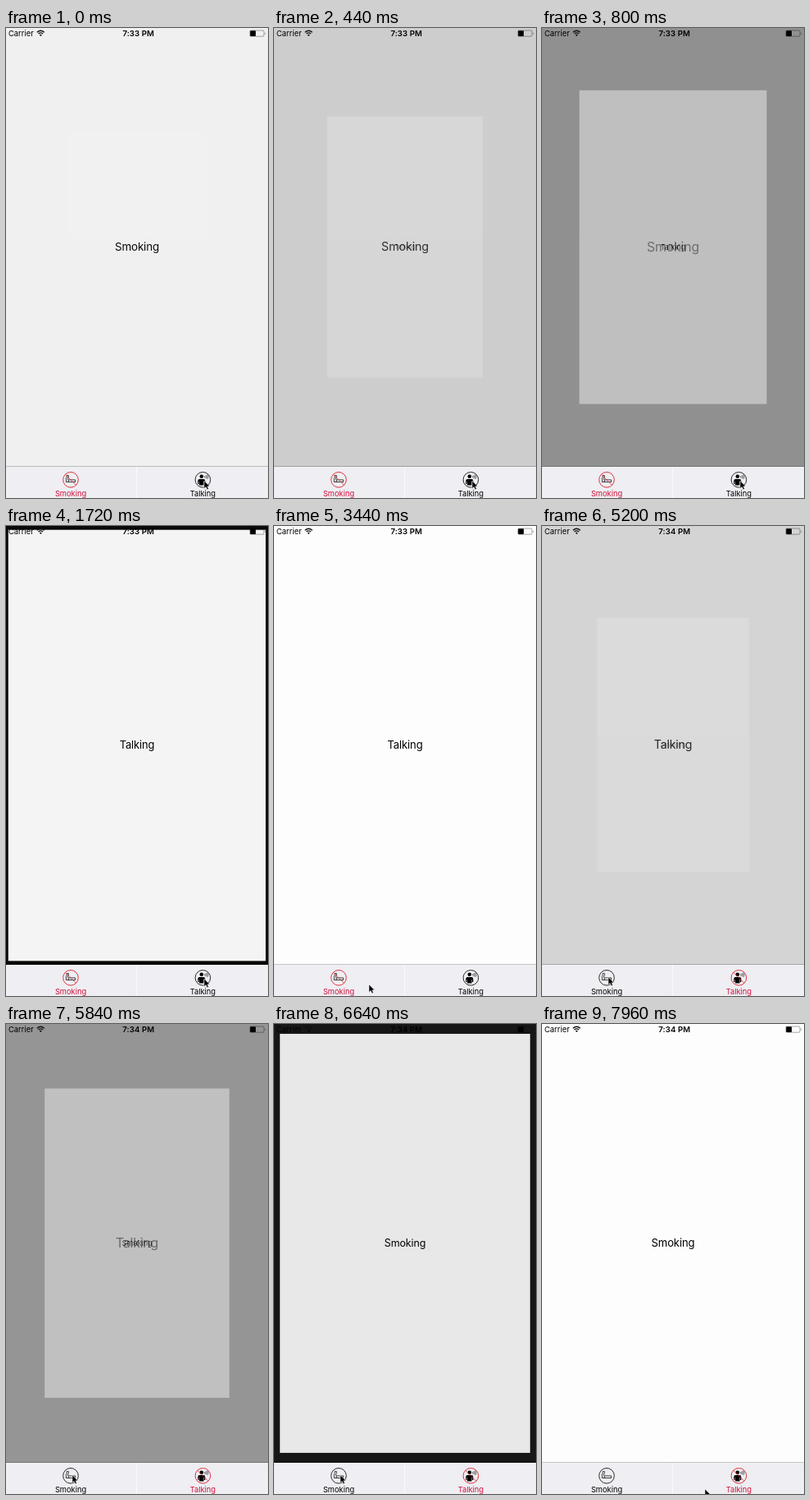
Write an HTML page that moves like this. It is 320 px wide and 572 px high and loops after 8 s.

```html
<!DOCTYPE html>
<html lang="en">
<head>
<meta charset="utf-8">
<title>Tab transition</title>
<style>
html, body { margin: 0; width: 100%; height: 100%; overflow: hidden; background: #000; }
svg { display: block; width: 320px; height: 572px; font-family: Inter, Roboto, sans-serif; }
.title { font-size: 13.1px; letter-spacing: -.15px; text-anchor: middle; }
.label { font-size: 9.3px; text-anchor: middle; fill: currentColor; }
.status { font-size: 9.4px; }
.clock { font-size: 9.6px; font-weight: 600; letter-spacing: .1px; text-anchor: middle; }
.tab { color: #000; }
.tab.on { color: #d0103a; }
.ring, .slash { fill: none; stroke: #222; stroke-width: .95; }
.slash { display: none; stroke-width: .8; }
.on .ring, .on .slash { display: inline; stroke: #dc2c34; }
.line { fill: none; stroke: #111; }
</style>
</head>
<body>
<svg viewBox="0 0 320 572">
  <rect width="320" height="572"/>
  <g id="views">
    <g id="smoking"><rect width="320" height="534" fill="#fdfdfd"/><text class="title" x="160" y="271">Smoking</text></g>
    <g id="talking"><rect width="320" height="534" fill="#fdfdfd"/><text class="title" x="160" y="271">Talking</text></g>
  </g>

  <text class="status" x="3" y="10.2">Carrier</text>
  <g class="line" stroke-width="1.3">
    <path d="M37.8 5.2Q42.3 1.2 46.8 5.2M39.5 7.1Q42.3 4.6 45.1 7.1"/>
    <path d="M42.3 10L40.8 8.3Q42.3 7.1 43.8 8.3Z" fill="#000" stroke="none"/>
  </g>
  <text class="clock" id="clock" x="161.7" y="10.2">7:33 PM</text>
  <rect x="298" y="3" width="17" height="7.2" rx="1.2" fill="none" stroke="#000" stroke-opacity=".5" stroke-width=".7"/>
  <rect x="298.2" y="3.2" width="6.8" height="6.8" rx=".8"/>
  <path d="M316 5.2q1.4 1.4 0 2.8z" opacity=".7"/>

  <rect y="534" width="320" height="38" fill="#eeeef3"/>
  <rect y="533" width="320" height="1" opacity=".22"/>
  <rect x="159" y="534" width="1" height="38" fill="#fafafc"/>

  <g class="tab" id="tabSmoking">
    <circle class="ring" cx="79" cy="549.8" r="9.3"/>
    <g class="line" stroke-width=".8">
      <path d="M74.2 544.6h2.2v2l-.8 1.4v1.7"/>
      <path d="M74.2 544.6v2.2l-.8 1.4v4.3h11.2v-2.6h-8.4v2.6"/>
    </g>
    <path class="slash" d="M72.4 543.2L85.6 556.4"/>
    <text class="label" x="79" y="570">Smoking</text>
  </g>
  <g class="tab" id="tabTalking">
    <circle class="ring" cx="240.4" cy="549.8" r="9.3"/>
    <circle cx="238.8" cy="545.8" r="2.3"/>
    <path d="M234.3 555V551.2Q234.3 549 236.4 549H241.2Q243.3 549 243.3 551.2V555H242V552H241.5V556.6H236.1V552H235.6V555Z"/>
    <path class="line" stroke-width=".7" d="M242.6 545q.8 1.2 0 2.4M244.2 544.2q1.4 2 0 4M245.9 543.5q2 2.7 0 5.4"/>
    <path class="slash" d="M233.8 543.2L247 556.4"/>
    <text class="label" x="240.4" y="570">Talking</text>
  </g>

  <path id="cursor" d="M0 0V9.4L2.2 7.4L3.7 10.8L5.4 10.1L4 6.8H6.9Z" stroke="#fff" stroke-width=".5"/>
</svg>
<script>
const LOOP = 8000, TICK = 40, REFRESH = 240;
const SWAP = 4840, MINUTE = 3640;
const $ = id => document.getElementById(id);

// Progress keys are [time, share of the transition done]
const toTalking = { from: "smoking", to: "talking", phase: 40, keys: [[0, .05], [760, .43], [1720, .965], [1960, 1]] };
const toSmoking = { from: "talking", to: "smoking", phase: 160, keys: [[SWAP, 0], [5200, .16], [6640, .91], [6880, 1]] };

// [time, x, y]
const pointer = [[2160, 242, 551], [3000, 166, 566], [3440, 116, 558], [4240, 81, 549], [7560, 81, 549], [7960, 199, 566]];

const snap = (t, step, phase = 0) => Math.floor((t - phase) / step) * step + phase;

// Linear path through the keys, held at both ends
function along(keys, t) {
  const i = keys.findIndex(key => key[0] > t);
  if (i < 1) return keys.at(i).slice(1);
  const [t0, ...a] = keys[i - 1], [t1, ...b] = keys[i];
  return a.map((v, n) => v + (b[n] - v) * (t - t0) / (t1 - t0));
}

function pose(view, scale, alpha) {
  view.setAttribute("transform", `translate(160 266) scale(${scale}) translate(-160 -266)`);
  view.setAttribute("opacity", alpha);
}

function draw(time) {
  const t = snap(time, TICK), back = t >= SWAP;
  const { from, to, phase, keys } = back ? toSmoking : toTalking;
  const [p] = along(keys, snap(t, REFRESH, phase));

  if ($("views").lastElementChild.id !== to) $("views").append($(to));
  pose($(from), 1 + p / 2, 1 - p);
  pose($(to), .5 + p / 2, p);

  $("tabSmoking").classList.toggle("on", !back);
  $("tabTalking").classList.toggle("on", back);
  $("clock").textContent = t < MINUTE ? "7:33 PM" : "7:34 PM";
  $("cursor").setAttribute("transform", `translate(${along(pointer, t)})`);
}

const start = performance.now();
function frame() {
  draw((performance.now() - start) % LOOP);
  requestAnimationFrame(frame);
}
frame();
</script>
</body>
</html>
```
